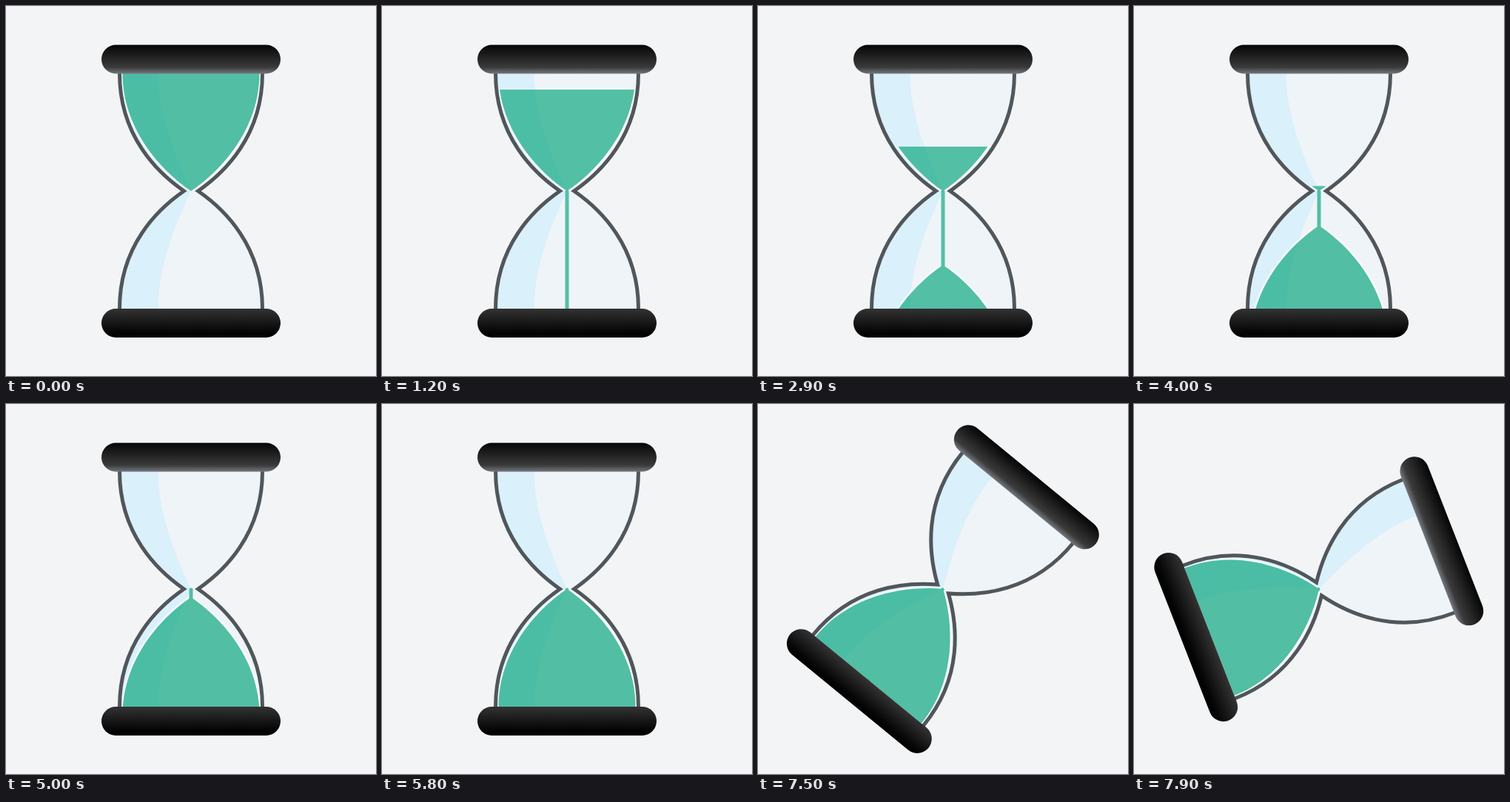
An HTML page that plays this animation: 500x500 px, repeating every 8 s.

```html
<!DOCTYPE html>
<html lang="en">
<head>
<meta charset="utf-8">
<title>Hourglass</title>
<style>
  html, body { margin: 0; height: 100%; overflow: hidden; background: #f2f4f6; }
  svg { display: block; width: 100%; height: 100%; }
</style>
</head>
<body>
<svg viewBox="-250 -250 500 500">
  <defs>
    <linearGradient id="topShade" x2="0" y2="1">
      <stop stop-color="#050505"/>
      <stop offset=".78" stop-color="#3b3b3b"/>
      <stop offset="1" stop-color="#73787f"/>
    </linearGradient>
    <linearGradient id="bottomShade" x2="0" y2="1">
      <stop stop-color="#333"/>
      <stop offset=".8" stop-color="#050505"/>
      <stop offset="1" stop-color="#000"/>
    </linearGradient>
    <path id="glass" d="M-96.5-164V-159C-96.5-74-45-24.5-9.5 0C-45 24.5-96.5 74-96.5 159V164H96.5V159C96.5 74 45 24.5 9.5 0C45-24.5 96.5-74 96.5-159V-164Z"/>
    <path id="sand" d="M-92.5 159C-92.5 85-42 28 0 0C42 28 92.5 85 92.5 159Z"/>
    <path id="shine" d="M-100 159V0H0C-23 48-46 110-44 159Z"/>
    <clipPath id="inside"><use href="#glass"/></clipPath>
    <clipPath id="upper"><rect id="level" x="-100" width="200"/></clipPath>
    <clipPath id="lower"><rect x="-100" y="-5" width="200" height="165"/></clipPath>
  </defs>
  <g id="hourglass">
    <use href="#glass" fill="#eff4f9"/>
    <g clip-path="url(#inside)" fill="#daf0fb">
      <use href="#shine"/>
      <use href="#shine" transform="scale(1 -1)"/>
    </g>
    <!-- translucent sand with a pale rim -->
    <g opacity=".7" fill="#10a881" stroke="#fff" stroke-width="5" stroke-linejoin="round" paint-order="stroke">
      <g clip-path="url(#upper)"><use href="#sand" transform="scale(1 -1)"/></g>
      <g clip-path="url(#lower)">
        <use id="pile" href="#sand"/>
        <path id="stream" stroke="#10a881" stroke-linecap="round"/>
      </g>
    </g>
    <use href="#glass" fill="none" stroke="#50565a" stroke-width="5"/>
    <rect x="-121" y="-197.5" width="242" height="39" rx="19.5" fill="url(#topShade)"/>
    <rect x="-121" y="159" width="242" height="39" rx="19.5" fill="url(#bottomShade)"/>
  </g>
</svg>
<script>
const LOOP = 8000, STEP = 100, DRAIN = 5800, TURN = 6200, TRAVEL = 200, FALL = 600;
const $ = id => document.getElementById(id);

const ease = x => .95 * x * x * (3 - 2 * x) + .05 * x;

// Accelerating turn in degrees, s in seconds.
const turn = s => {
  const a = s - .5, b = s - .9, c = s - 1.3;
  return s * (17.74 + a * (13.98 + b * (4.2 + c * 4.8)));
};

function draw(t) {
  const moved = TRAVEL * ease(Math.min(t / DRAIN, 1));
  const top = -160 + moved;
  $('level').setAttribute('y', top);
  $('level').setAttribute('height', Math.max(0, -top));
  $('pile').setAttribute('transform', `translate(0 ${TRAVEL - moved})`);
  $('stream').setAttribute('d', t ? `M0 1V${1 + 159 * Math.min(t / FALL, 1)}` : '');
  $('hourglass').setAttribute('transform', `rotate(${turn(Math.max(0, t - TURN) / 1000)})`);
}

const start = performance.now();
function tick() {
  const t = (performance.now() - start) % LOOP;
  draw(Math.floor(t / STEP) * STEP);
  requestAnimationFrame(tick);
}
tick();
</script>
</body>
</html>
```
